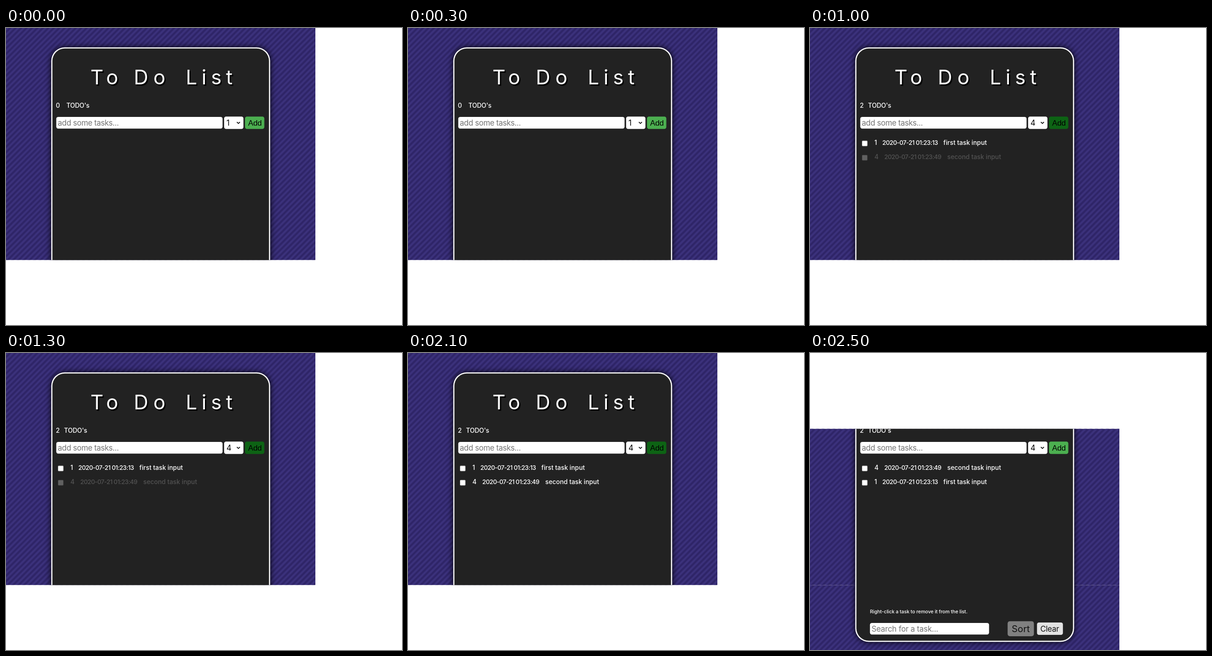
An HTML page with a canvas for the animation above (3 s loop, 864x648 px).

```html
<!DOCTYPE html>
<html lang="en">
<head>
<meta charset="utf-8">
<title>To Do List</title>
<style>
  html, body { margin: 0; width: 100%; height: 100%; overflow: hidden; background: #fff; }
  canvas { display: block; }
</style>
</head>
<body>
<canvas id="stage" width="864" height="648"></canvas>
<script>
const ctx = document.getElementById('stage').getContext('2d');
const SANS = 'Inter, "Open Sans", sans-serif';
const ARIAL = '"Liberation Sans", Arial, sans-serif';
const LOOP = 3000;

// The page is laid out on 1024 x 768 and scaled to the stage.
const SCALE = 864 / 1024, WIDTH = 800, TILE = 600, BAND = 5;

const FIRST = { rank: '1', date: '2020-07-21 01:23:13', name: 'first task input', dateX: 187, nameX: 345 };
const SECOND = { rank: '4', date: '2020-07-21 01:23:49', name: 'second task input', dateX: 192, nameX: 355 };

const STATES = [
  { until: 500, count: 0, countX: 156, rank: 1, tasks: [] },
  { until: 1000, count: 1, countX: 147, rank: 1, hover: true, tasks: [[FIRST, 0.3]] },
  { until: 1500, count: 2, countX: 150, rank: 4, hover: true, tasks: [[FIRST, 1], [SECOND, 0.22]] },
  { until: 2500, count: 2, countX: 150, rank: 4, hover: true, tasks: [[FIRST, 1], [SECOND, 1]] },
  { until: LOOP, count: 2, countX: 150, rank: 4, scrolled: true, tasks: [[SECOND, 1], [FIRST, 1]] }
];

function box(x, y, w, h, r, color) {
  ctx.fillStyle = color;
  ctx.beginPath();
  ctx.roundRect(x, y, w, h, r);
  ctx.fill();
}

function label(text, x, y, size, color = '#fff', { spacing = 0, font = SANS, weight = 400 } = {}) {
  ctx.font = `${weight} ${size}px ${font}`;
  ctx.letterSpacing = spacing + 'px';
  ctx.fillStyle = color;
  ctx.fillText(text, x, y);
}

// Diagonal bands counted from the bottom right corner, dark one first.
function stripes(top) {
  const step = 2 * BAND * Math.SQRT2, end = top + TILE;
  ctx.save();
  ctx.beginPath();
  ctx.rect(0, top, WIDTH, TILE);
  ctx.clip();
  ctx.fillStyle = '#2f2568';
  ctx.fillRect(0, top, WIDTH, TILE);
  ctx.strokeStyle = '#3b317b';
  ctx.lineWidth = BAND;
  for (let sum = WIDTH + end - step * 0.75; sum > top - step; sum -= step) {
    ctx.beginPath();
    ctx.moveTo(sum - top + 9, top - 9);
    ctx.lineTo(sum - end - 9, end + 9);
    ctx.stroke();
  }
  ctx.restore();
}

function card() {
  ctx.save();
  ctx.shadowColor = '#000';
  ctx.shadowBlur = 13;
  box(117, 50, 566, 697, 35, '#fff');
  ctx.restore();
  box(120, 53, 560, 691, 32, '#222');
}

function heading() {
  ctx.save();
  ctx.shadowColor = '#000';
  ctx.shadowBlur = 1;
  ctx.shadowOffsetX = ctx.shadowOffsetY = 2.6;
  label('To', 218.5, 146, 52, '#fff', { spacing: 11 });
  label('Do', 330.5, 146, 52, '#fff', { spacing: 13 });
  label('List', 465, 146, 52, '#fff', { spacing: 11.5 });
  ctx.restore();
}

function form(state) {
  label(state.count, 129, 206, 16.4, '#fff', { weight: 500 });
  label("TODO's", state.countX, 206, 16.4, '#fff', { weight: 500, spacing: -0.2 });
  box(130, 230, 430, 30, 5, '#fff');
  label('add some tasks...', 134, 252, 20, '#757575', { spacing: -0.5 });
  box(564, 229, 50, 32, 5, '#fff');
  label(state.rank, 570, 252, 20, '#000');
  ctx.strokeStyle = '#000';
  ctx.lineWidth = 2;
  ctx.beginPath();
  ctx.moveTo(597, 243);
  ctx.lineTo(601, 247);
  ctx.lineTo(605, 243);
  ctx.stroke();
  box(618, 229, 50, 32, 5, state.hover ? '#0d6314' : '#4caf50');
  label('Add', 626, 252, 20, '#000', { font: ARIAL });
}

function task([item, alpha], row) {
  const y = 302 + row * 37;
  ctx.globalAlpha = alpha;
  box(134, y - 11, 15, 15, 2.5, '#767676');
  box(135, y - 10, 13, 13, 1.5, '#fff');
  label(item.rank, 166.5, y, 16.4, '#fff', { weight: 500 });
  label(item.date, item.dateX, y, 16, '#fff', { weight: 500, spacing: -0.75 });
  label(item.name, item.nameX, y, 16.4, '#fff', { weight: 500 });
  ctx.globalAlpha = 1;
}

function footer() {
  label('Right-click a task to remove it from the list.', 155, 673, 12.6, '#fff', { weight: 500, spacing: -0.1 });
  box(155, 698, 308, 30, 5, '#fff');
  label('Search for a task...', 159, 720.5, 20, '#757575', { spacing: -0.25 });
  box(511, 693.5, 68, 39, 6, '#808080');
  label('Sort', 521.5, 721.5, 24, '#111');
  box(587, 697, 67, 32, 5, '#e3e3e3');
  label('Clear', 595.5, 720.5, 20, '#111', { spacing: -0.3 });
}

function draw(time) {
  const state = STATES.find(s => time < s.until);
  ctx.fillStyle = '#fff';
  ctx.fillRect(0, 0, 864, 648);
  ctx.save();
  ctx.scale(SCALE, SCALE);
  ctx.beginPath();
  if (state.scrolled) ctx.rect(0, 196, WIDTH, 572);
  else ctx.rect(0, 0, WIDTH, TILE);
  ctx.clip();
  stripes(0);
  stripes(TILE);
  card();
  heading();
  form(state);
  state.tasks.forEach(task);
  footer();
  ctx.restore();
}

const start = performance.now();
function tick() {
  draw((performance.now() - start) % LOOP);
  requestAnimationFrame(tick);
}
tick();
</script>
</body>
</html>
```
